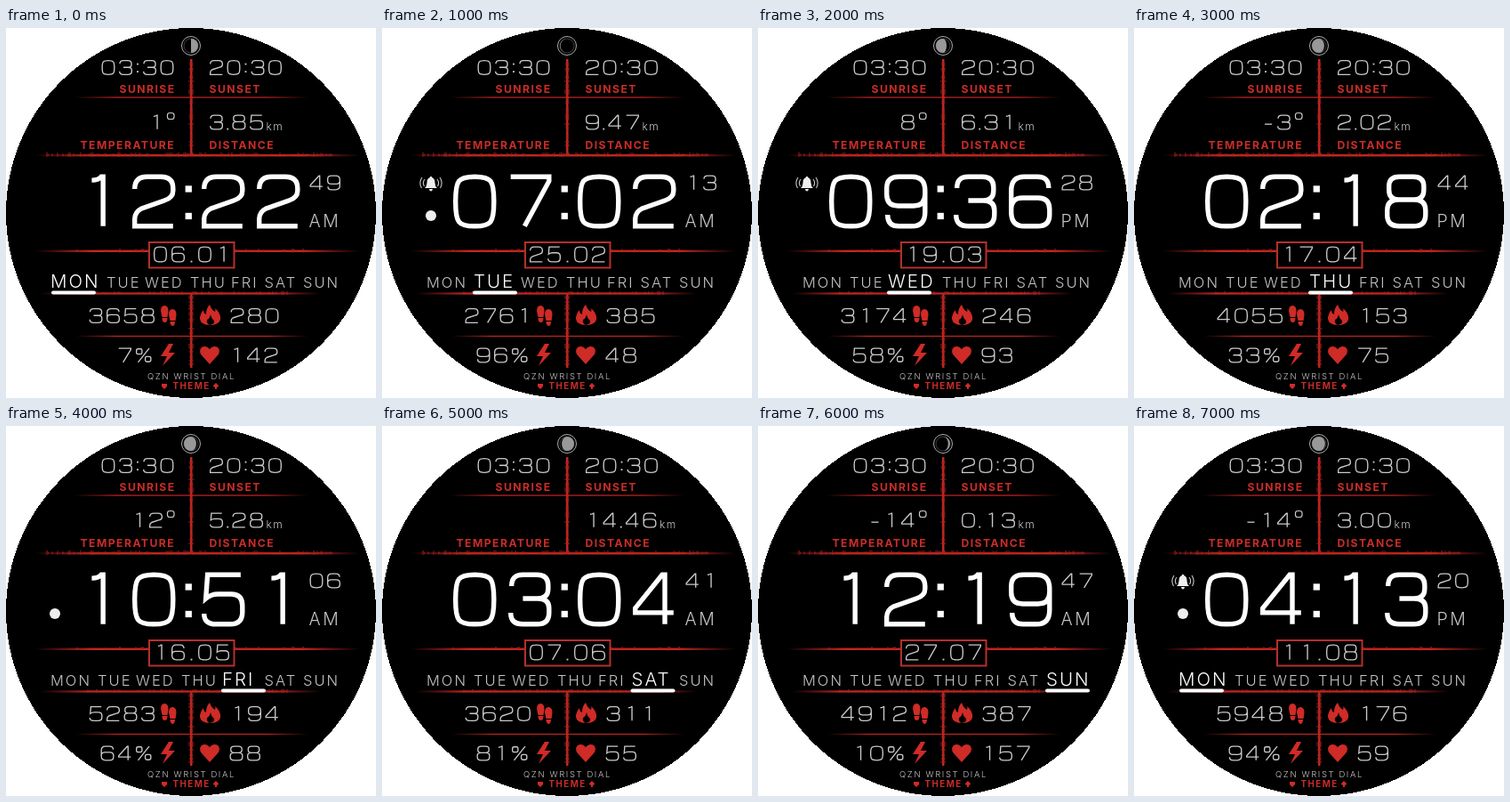
Recreate the animation shown at these times as an HTML page. Size 416x416 px, loop 8000 ms.

```html
<!DOCTYPE html>
<html lang="en">
<head>
<meta charset="utf-8">
<title>Watch dial</title>
<style>
html, body { margin: 0; width: 100%; height: 100%; overflow: hidden; background: #fff; }
svg { display: block; width: 416px; height: 416px; }
text { font-family: Inter, "Open Sans", sans-serif; }
.label { font-weight: 700; font-size: 12.2px; letter-spacing: 1.45px; fill: #ca2d28; }
.thin { font-weight: 300; fill: #c4c4c4; }
.icon { fill: #cf2b27; }
</style>
</head>
<body>
<svg viewBox="0 0 416 416" xmlns="http://www.w3.org/2000/svg">
  <defs>
    <linearGradient id="fade">
      <stop offset="0" stop-color="#c42622" stop-opacity="0"/>
      <stop offset=".18" stop-color="#c42622"/>
      <stop offset=".82" stop-color="#c42622"/>
      <stop offset="1" stop-color="#c42622" stop-opacity="0"/>
    </linearGradient>
  </defs>
  <circle cx="208" cy="208" r="208" shape-rendering="crispEdges"/>
  <g id="rails"></g>
  <rect x="161" y="241" width="95.500" height="28.500" stroke="#b5302b" stroke-width="2"/>

  <text class="label" x="127.500" y="72.500">SUNRISE</text>
  <text class="label" x="228.500" y="72.500">SUNSET</text>
  <text class="label" x="83.500" y="136">TEMPERATURE</text>
  <text class="label" x="228.500" y="136">DISTANCE</text>
  <text class="thin" x="208.500" y="395" text-anchor="middle" font-size="9.5" letter-spacing="1.6">QZN WRIST DIAL</text>
  <text class="label" x="187.500" y="406" style="font-size:9.8px">THEME</text>

  <g class="icon">
    <path d="M175 400h6v3l-3 3l-3-3zM233 402l3-3l3 3v1l-2 1v2h-2v-2l-2-1z"/>
    <path d="M174 318Q174 312 178.500 312Q183 313 182.500 319L181.500 325H175.500ZM175.500 326H181.500Q181.500 331 178.500 331Q175.500 331 175.500 326Z"/>
    <path d="M183 322Q183 316 187.500 316Q192 317 191.500 323L190.500 329H184.500ZM184.500 330H190Q190 335 187 335Q184.500 334 184.500 330Z"/>
    <path d="M229 311Q231 317 235 319Q236 317 235 315Q242 321 241 328Q239 334 229 334Q219 334 218 327Q218 322 222 317Q222 321 225 322Q225 315 229 311Z"/>
    <path d="M230 322Q229 327 226 328Q225 332 229 334Q235 333 234 329Q231 327 230 322Z" fill="#000"/>
    <path d="M183 355L174 369H181L176 380L190 365H183L188 355Z"/>
    <path d="M229 378L220 368Q216 363 220 359Q225 356 229 361Q233 356 238 359Q242 363 238 368Z"/>
  </g>
  <g id="live"></g>
</svg>
<script>
const RED = '#c42622', GREY = '#cacaca';
const DAYS = ['MON', 'TUE', 'WED', 'THU', 'FRI', 'SAT', 'SUN'];
const DAY_X = [50, 103, 146, 197, 243, 280.5, 324];

// Centre lines of the digits in a 44 x 56 cell
const GLYPHS = {
  0: 'M22 0C41 0 44 4 44 28S41 56 22 56S0 52 0 28S3 0 22 0Z',
  1: 'M14 4Q22 4 25 0H27V56',
  2: 'M0 14Q0 0 14 0H30Q44 0 44 13V16Q44 24 34 27L8 36Q0 40 0 48V56H44',
  3: 'M1 13Q1 0 14 0H30Q43 0 43 12V16Q43 27 31 27H14M31 27Q44 27 44 38V43Q44 56 30 56H14Q0 56 0 43',
  4: 'M34 56V0H31L0 38V43H44',
  5: 'M42 0H4L2 27Q8 22 16 22H31Q44 22 44 35V42Q44 56 30 56H14Q0 56 0 44',
  6: 'M43 13Q43 0 30 0H15Q0 0 0 16V40Q0 56 15 56H30Q44 56 44 43V37Q44 24 31 24H13Q0 24 0 37',
  7: 'M0 0H44V5L16 56',
  8: 'M14 0H30Q42 0 42 11V15Q42 26 31 26H13Q2 26 2 15V11Q2 0 14 0ZM13 26H31Q44 26 44 38V43Q44 56 30 56H14Q0 56 0 43V38Q0 26 13 26Z',
  9: 'M1 43Q1 56 14 56H29Q44 56 44 40V16Q44 0 29 0H14Q0 0 0 13V20Q0 33 13 33H31Q44 33 44 20',
  '%': 'M39 0L5 56M6 2H12Q17 2 17 8V17Q17 23 12 23H6Q0 23 0 17V8Q0 2 6 2ZM32 33H38Q44 33 44 39V48Q44 54 38 54H32Q27 54 27 48V39Q27 33 32 33Z'
};

// moon: lit share, negative when the left side is lit
const STATES = [
  { time: '12:22', sec: '49', half: 'AM', date: '06.01', day: 0, temp: '1', dist: '3.85', steps: '3658', kcal: '280', power: '7', pulse: '142', moon: .5 },
  { time: '07:02', sec: '13', half: 'AM', date: '25.02', day: 1, temp: '', dist: '9.47', steps: '2761', kcal: '385', power: '96', pulse: '48', moon: -.04, bell: 1, link: 1 },
  { time: '09:36', sec: '28', half: 'PM', date: '19.03', day: 2, temp: '8', dist: '6.31', steps: '3174', kcal: '246', power: '58', pulse: '93', moon: -.75, bell: 1 },
  { time: '02:18', sec: '44', half: 'PM', date: '17.04', day: 3, temp: '-3', dist: '2.02', steps: '4055', kcal: '153', power: '33', pulse: '75', moon: -.87 },
  { time: '10:51', sec: '06', half: 'AM', date: '16.05', day: 4, temp: '12', dist: '5.28', steps: '5283', kcal: '194', power: '64', pulse: '88', moon: -.87, link: 1 },
  { time: '03:04', sec: '41', half: 'AM', date: '07.06', day: 5, temp: '', dist: '14.46', steps: '3620', kcal: '311', power: '81', pulse: '55', moon: .87 },
  { time: '12:19', sec: '47', half: 'AM', date: '27.07', day: 6, temp: '-14', dist: '0.13', steps: '4912', kcal: '387', power: '10', pulse: '157', moon: .14 },
  { time: '04:13', sec: '20', half: 'PM', date: '11.08', day: 0, temp: '-14', dist: '3.00', steps: '5948', kcal: '176', power: '94', pulse: '59', moon: -.93, bell: 1, link: 1 }
];

const rect = (x, y, w, h, fill, extra = '') =>
  `<rect x="${x}" y="${y}" width="${w}" height="${h}" fill="${fill}" ${extra}/>`;
const word = (s, x, y, size, gap, extra = '') =>
  `<text class="thin" x="${x}" y="${y}" font-size="${size}" letter-spacing="${gap}" ${extra}>${s}</text>`;

const SMALL = { w: 15, h: 17, adv: 19.5, gap: 6, line: 1.35, color: GREY };
const CLOCK = { ...SMALL, gap: 7.5 };
const DATE = { ...SMALL, h: 18, adv: 20, gap: 10 };
const PERCENT = { ...SMALL, w: 17.5 };
const BIG = { w: 48.5, h: 61, adv: 62, gap: 16, line: 5.4, color: '#fff' };

function digits(str, x, y, f = SMALL) {
  const sx = (f.w - f.line) / 44, sy = (f.h - f.line) / 56;
  const dot = f.line * 1.35;
  let out = '';
  for (const c of str) {
    if (c === '.' || c === ':') {
      const left = x + (f.gap - f.adv + f.w) / 2 - dot / 2;
      const rows = c === '.' ? [f.h - dot] : [f.h * .27 - dot / 2, f.h * .77 - dot / 2];
      out += rows.map(r => rect(left, y + r, dot, dot, f.color, 'stroke="none"')).join('');
      x += f.gap;
    } else {
      out += `<path d="${GLYPHS[c]}" transform="translate(${x + f.line / 2} ${y + f.line / 2}) scale(${sx} ${sy})" vector-effect="non-scaling-stroke"/>`;
      x += f.adv;
    }
  }
  return `<g role="img" aria-label="${str}" fill="none" stroke="${f.color}" stroke-width="${f.line}">${out}</g>`;
}

// Digits that end at a given right edge
const digitsTo = (str, right, y) => digits(str, right - SMALL.w - (str.length - 1) * SMALL.adv, y);

function temperature(t) {
  if (!t) return '';
  const n = t.replace('-', '');
  const left = 176 - SMALL.w - (n.length - 1) * SMALL.adv;
  const minus = t === n ? '' : rect(left - 14, 107.5, 8, 1.3, GREY);
  return minus + digitsTo(n, 176, 97.5) +
    `<rect x="181.500" y="95.500" width="7.500" height="7" rx="2.500" fill="none" stroke="${GREY}" stroke-width="1.200"/>`;
}

function week(active) {
  const words = DAYS.map((d, i) => {
    const x = DAY_X[i] + (i > active ? 10 : 0);
    return i === active
      ? word(d, x, 291.5, 20.5, 2, 'style="fill:#fff"')
      : word(d, x, 292, 16.5, 2);
  });
  return words.join('') + rect(DAY_X[active] - (active ? 1 : -1), 295.5, 50, 4, '#fff', 'rx="2"');
}

function moon(m) {
  const r = 8, lit = Math.abs(m);
  const rx = r * Math.abs(1 - 2 * lit);
  return `<g transform="translate(208 20) scale(${m < 0 ? -1 : 1} 1)">
    <circle r="10.5" stroke="#aaa"/>
    <circle r="8" stroke="#555" stroke-width=".7"/>
    <path d="M0 ${-r}A${r} ${r} 0 0 1 0 ${r}A${rx} ${r} 0 0 ${lit > .5 ? 1 : 0} 0 ${-r}Z" fill="#999"/></g>`;
}

const bell = () => `<g transform="translate(55 175)" fill="#eee">
  <path d="M-7 5Q-4.500 3-4.500-1Q-4.500-6-1-7V-8H1V-7Q4.500-6 4.500-1Q4.500 3 7 5ZM-2 6H2Q1.500 8.500 0 8.500Q-1.500 8.500-2 6Z"/>
  <path d="M-7-5Q-10-1-7.500 3M-10-7Q-14-1-10.500 5M7-5Q10-1 7.500 3M10-7Q14-1 10.500 5" fill="none" stroke="#ccc" stroke-width="1.100"/></g>`;

function face(s) {
  const km = 229 + SMALL.w + (s.dist.length - 2) * SMALL.adv + SMALL.gap + 3.5;
  return moon(s.moon) +
    digits('03:30', 107.5, 36, CLOCK) + digits('20:30', 229, 36, CLOCK) +
    temperature(s.temp) + digits(s.dist, 229, 97.5) + word('km', km, 114.5, 12, 1.4) +
    digits(s.time, 80, 164.5, BIG) + digits(s.sec, 341.5, 165.5) + word(s.half, 340.5, 224, 19.5, 2.5) +
    digits(s.date, 166, 245.5, DATE) + week(s.day) +
    digitsTo(s.steps, 167, 315) + digits(s.kcal, 252.5, 315) +
    digitsTo(s.power, 141, 359.5) + digits('%', 146, 359.5, PERCENT) + digits(s.pulse, 251.5, 359.5) +
    (s.bell ? bell() : '') + (s.link ? '<circle cx="55" cy="211" r="6" fill="#eee"/>' : '');
}

let seed = 7;
const rnd = () => (seed = seed * 16807 % 2147483647) / 2147483647;

// Short spikes along a line
function spikes(a, b, at, size, vertical, chance) {
  let d = '';
  for (let p = a; p < b; p += 2) {
    if (rnd() > chance) continue;
    const n = 1 + rnd() * size;
    d += vertical ? `M${at - n} ${p}H${at + n}` : `M${p} ${at - n}V${at + n * .6}`;
  }
  return `<path d="${d}" stroke="#a8221f" fill="none"/>`;
}

const bar = (x, y, w, h) => rect(x, y - h / 2, w, h, 'url(#fade)');
document.getElementById('rails').innerHTML =
  bar(76, 78, 264, 1.2) + bar(32, 143.2, 366, 2.4) + bar(32, 250.8, 366, 2.4) +
  bar(38, 298.5, 316, 2.2) + bar(78, 346.5, 262, 1.2) +
  rect(207, 35, 2.5, 108, RED) + rect(207, 298, 2.5, 84, RED) +
  spikes(46, 372, 143, 2.4, false, .6) +
  spikes(66, 158, 250.8, 2, false, .35) + spikes(258, 350, 250.8, 2, false, .35) +
  spikes(90, 318, 298.5, 1.8, false, .6) +
  spikes(38, 143, 208.2, 2.4, true, .75) + spikes(300, 380, 208.2, 2.4, true, .75);

const live = document.getElementById('live');
let shown = -1;
function draw(ms) {
  const i = Math.floor(ms % 8000 / 1000);
  if (i === shown) return;
  shown = i;
  live.innerHTML = face(STATES[i]);
}

const start = performance.now();
function tick() {
  draw(performance.now() - start);
  requestAnimationFrame(tick);
}
tick();
</script>
</body>
</html>
```
